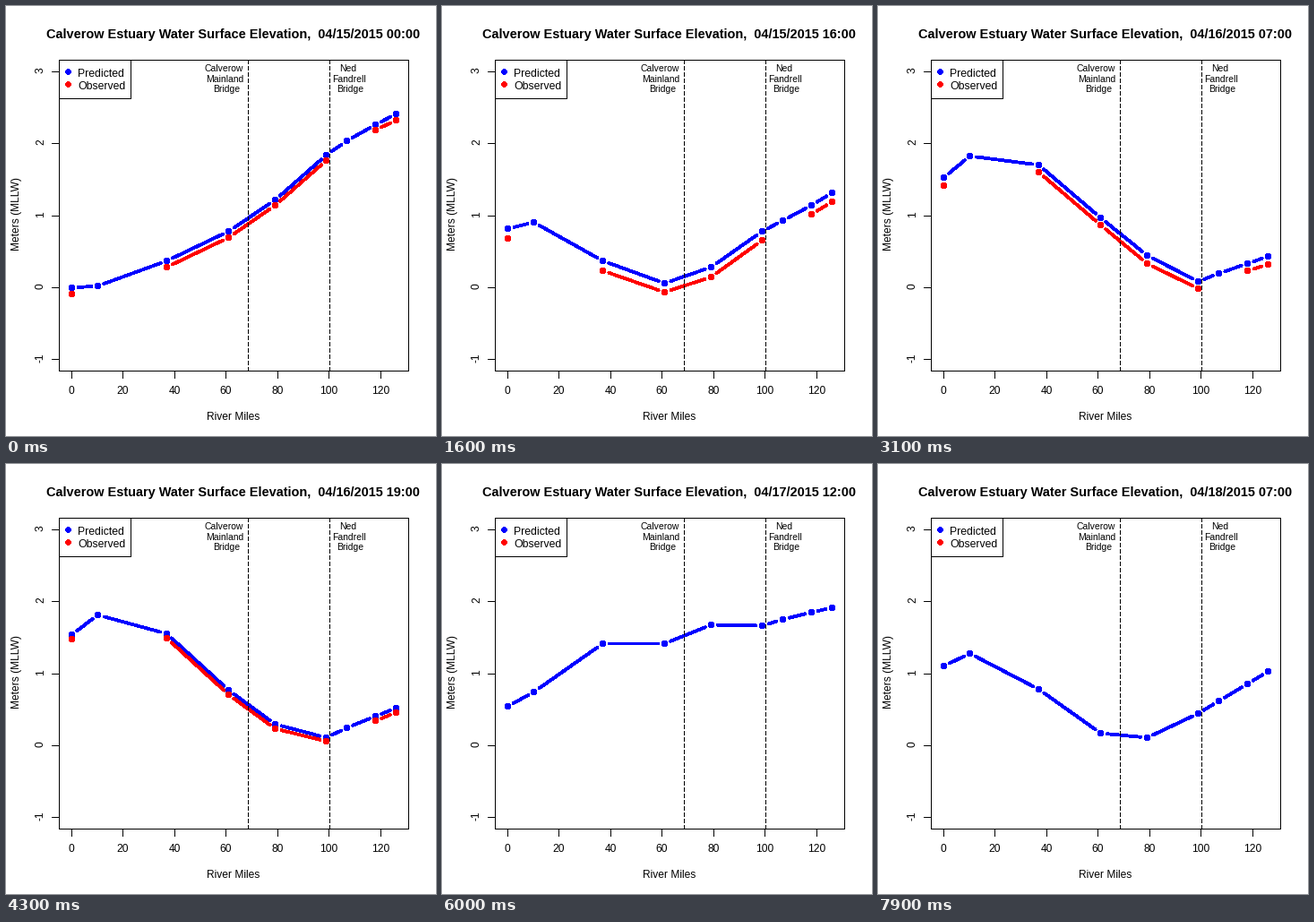
A matplotlib script for the animation above (8 s loop, 480 by 480 pixels).

```python
import numpy as np
import matplotlib.pyplot as plt
from matplotlib.animation import FuncAnimation
from matplotlib.patches import Circle, Rectangle

SIZE, DPI = 480, 80
PT = 72 / DPI  # points per pixel
HOURS, LAST_OBSERVED = 80, 58
TIDE = 2 * np.pi / 12.42  # radians per hour

plt.rcParams["font.family"] = "Liberation Sans"

MILES = np.array([0, 10, 37, 61, 79, 99, 107, 118, 126])
UNGAUGED = [1, 6]


def along(*values):
    """A quantity that varies between key miles of the river."""
    return np.interp(MILES, (0, 10, 37, 61, 79, 99, 126), values)


MEAN = along(.77, .935, 1.03, .89, .97, 1.06, 1.45)
AMP = along(.81, .97, 1.1, .83, .76, .9, 1.04)
LAG = np.radians(along(13.5, 18, 51, 82, 120, 172, 188))
SHALLOW = .21 * np.exp(-((MILES - 74) / 26) ** 2)
SHALLOW_LAG = np.radians(90 + 2 * (MILES - 61))
UPSTREAM = MILES / 126


def predicted(hour):
    a = TIDE * hour
    tide = MEAN - AMP * np.cos(a - LAG)
    overtide = SHALLOW * np.cos(2 * a - SHALLOW_LAG)
    daily = -.04 * (1 - UPSTREAM) * np.sin(a / 2)
    runoff = .0025 * (hour - 32) * UPSTREAM ** 3
    return tide + overtide + daily + runoff


def observed(hour):
    level = predicted(hour) - .085 - .045 * np.sin(2 * np.pi * hour / 72)
    level[UNGAUGED] = np.nan
    if hour > LAST_OBSERVED:
        level[:] = np.nan
    return level


def px(mile):
    return np.round(73 + 2.871 * mile)


def py(level):
    return np.round(313 - 80.45 * level)


fig = plt.figure(figsize=(SIZE / DPI, SIZE / DPI), dpi=DPI, facecolor="white")
ax = fig.add_axes([0, 0, 1, 1])
ax.set(xlim=(0, SIZE), ylim=(SIZE, 0))
ax.axis("off")


def label(x, y, text, size=12, ha="center", **kw):
    return ax.text(x, y, text, fontsize=size * PT, ha=ha, va="baseline",
                   rotation_mode="anchor", zorder=6, **kw)


# Thin lines snap half a pixel right and up, hence y + 1
def rule(x0, y0, x1, y1, **kw):
    ax.plot([x0, x1], [y0 + 1, y1 + 1], color="black", lw=PT,
            antialiased=False, solid_capstyle="butt", zorder=4, **kw)


def box(x0, y0, x1, y1, fill, z):
    ax.add_patch(Rectangle((x0, y0 + 1), x1 - x0, y1 - y0, facecolor=fill,
                           edgecolor="black", lw=PT, antialiased=False,
                           zorder=z))


def dot(x, y, color, radius, z):
    return ax.add_patch(Circle((x + .5, y + .5), radius, color=color, lw=0,
                               antialiased=False, zorder=z))


# Frame and axes
box(59, 59, 449, 406, "none", 4)
for mile in range(0, 121, 20):
    x = px(mile)
    rule(x, 406, x, 414)
    label(x, 433, str(mile))
for level in range(-1, 4):
    y = py(level)
    rule(51, y, 59, y)
    label(42, y, str(level), rotation=90)
label(254, 462, "River Miles")
label(14.5, 232, "Meters (MLLW)", rotation=90)
title = label(253.7, 36, "", 14.5, weight="bold")

# Bridges
for x in (270, 361):
    rule(x, 406, x, 59, dashes=(4, 2), dash_capstyle="butt")
for x, words in ((243, ("Calverow", "Mainland", "Bridge")),
                 (381.5, ("Ned", "Fandrell", "Bridge"))):
    for i, word in enumerate(words):
        label(x + 1.5 * i, 73 + 11.6 * i, word, 10.4)

# Legend
box(59, 59, 139, 102, "white", 5)
for y, word, color in ((73, "Predicted", "blue"), (87, "Observed", "red")):
    dot(69, y, color, 2.6, 6)
    label(80, y + 6, word, 12.2, ha="left")


def broken_line(x, y, gap=7.2):
    """Segments between neighbours that stop short of the points."""
    xs, ys = [], []
    for x0, y0, x1, y1 in zip(x, y, x[1:], y[1:]):
        d = np.hypot(x1 - x0, y1 - y0)
        if d > 2 * gap:  # also false for missing points
            ux, uy = gap * (x1 - x0) / d, gap * (y1 - y0) / d
            xs += [x0 + ux, x1 - ux, np.nan]
            ys += [y0 + uy, y1 - uy, np.nan]
    return xs, ys


class Series:
    def __init__(self, levels, color, z):
        self.levels = levels
        self.line, = ax.plot([], [], color=color, lw=2.8 * PT, zorder=z,
                             antialiased=False, solid_capstyle="round")
        self.dots = [dot(0, 0, color, 3.1, z + .1) for _ in MILES]

    def update(self, hour):
        x, y = px(MILES) + .5, py(self.levels(hour)) + .5
        self.line.set_data(*broken_line(x, y))
        for circle, cx, cy in zip(self.dots, x, y):
            circle.set_visible(bool(np.isfinite(cy)))
            if np.isfinite(cy):
                circle.center = cx, cy


plots = [Series(predicted, "blue", 2), Series(observed, "red", 3)]


def draw(hour):
    day, clock = divmod(hour, 24)
    title.set_text("Calverow Estuary Water Surface Elevation,  "
                   f"04/{15 + day}/2015 {clock:02d}:00")
    for plot in plots:
        plot.update(hour)
    return [title]


anim = FuncAnimation(fig, draw, frames=HOURS, interval=100, repeat=True,
                     repeat_delay=0, blit=False)
plt.show()
```
